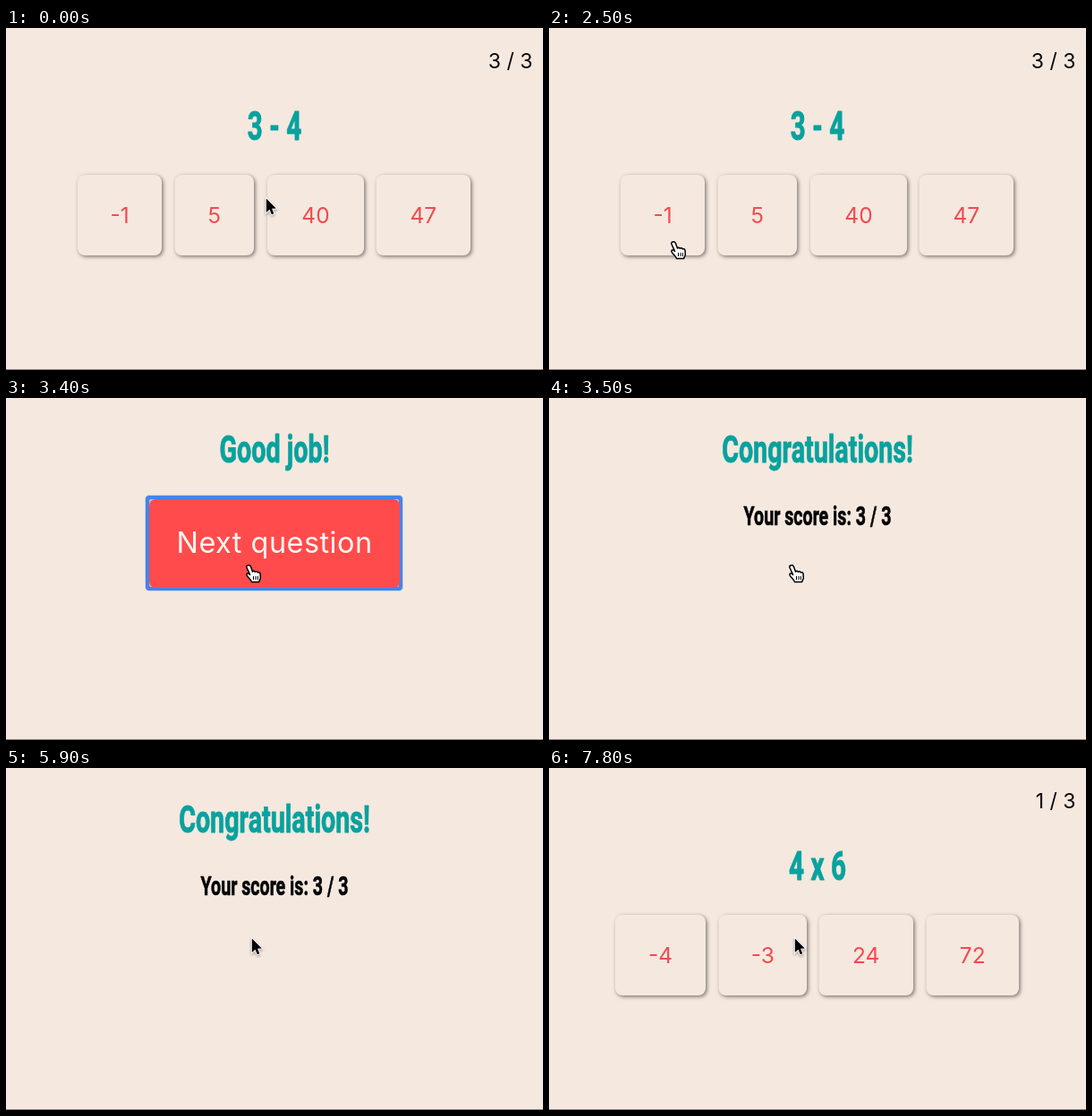
Animation, 600 px wide and 382 px high, one loop 8000 ms. Source, as an HTML page with a canvas:

```html
<!DOCTYPE html>
<html lang="en">
<head>
<meta charset="utf-8">
<title>Arithmetic quiz</title>
<style>
html, body { margin: 0; width: 100%; height: 100%; overflow: hidden; background: #f5e8df; }
canvas { display: block; width: 600px; height: 382px; }
</style>
</head>
<body>
<canvas id="stage" width="600" height="382"></canvas>
<script>
const ctx = document.getElementById('stage').getContext('2d');
const LOOP = 8000, TICK = 100;
const PAPER = '#f5e8df', TEAL = '#08a29e', RED = '#ef4b50', BLACK = '#050505';
const SANS = 'Inter, "Open Sans", sans-serif';
const HEADING = 'Roboto, "Liberation Sans", sans-serif';
const NARROW = 0.667; // proportion of the condensed heading face

const CARD_Y = 164, CARD_H = 90;
const BUTTON = { x: 160, y: 113, w: 280, h: 99 };

// Cards: left edge, width, answer
const lastQuestion = {
  text: '3 - 4', progress: '3 / 3',
  cards: [[80, 94, '-1'], [188.5, 88.5, '5'], [292, 108, '40'], [413.5, 105.5, '47']]
};
const firstQuestion = {
  text: '4 x 6', progress: '1 / 3',
  cards: [[74, 101, '-4'], [189.5, 98.5, '-3'], [301.5, 105.5, '24'], [421.5, 103.5, '72']]
};

// Pointer moves: start, end, destination
const START = [290, 189];
const MOVES = [
  [0, 200, 291, 191],
  [300, 900, 248, 256],
  [2100, 2500, 142, 241],
  [2700, 3300, 274, 189]
];

const ARROW = new Path2D('M0 0V15.6L3.7 12.2L6 17.8L8.5 16.8L6.3 11.3L11 11Z');
const HAND = new Path2D('M4 1.5q2.5-1 3.5 1.5l2 5.5c1-1.2 2.4-.8 2.8.3c1-1 2.4-.6 2.9.6' +
  'c1.5-.7 2.8.2 2.9 2l.2 4c0 1.8-1.5 2.5-1.6 4.6H8.6c-.6-2-3-4-5-6.5' +
  'c-1.6-2-.3-3.8 1.4-2.8l1.6 1.2L3 4q-.8-1.8 1-2.5z');
const KNUCKLES = new Path2D('M10.5 13.5v4M13 13.5v4M15.3 13.5v4');

function pointerAt(t) {
  let [x, y] = START;
  for (const [from, to, tx, ty] of MOVES) {
    const p = Math.min(1, Math.max(0, (t - from) / (to - from)));
    const e = p * p * (3 - 2 * p);
    x += (tx - x) * e;
    y += (ty - y) * e;
  }
  return { x, y };
}

function inside(p, x, y, w, h) {
  return p.x >= x && p.x <= x + w && p.y >= y && p.y <= y + h;
}

function fillRound(x, y, w, h, r, color) {
  ctx.fillStyle = color;
  ctx.beginPath();
  ctx.roundRect(x, y, w, h, r);
  ctx.fill();
}

function heading(text, y, size, color) {
  ctx.save();
  ctx.translate(300, y);
  ctx.scale(NARROW, 1);
  ctx.font = `700 ${size}px ${HEADING}`;
  ctx.textAlign = 'center';
  ctx.fillStyle = ctx.strokeStyle = color;
  ctx.lineWidth = size / 45;
  ctx.lineJoin = 'round';
  ctx.fillText(text, 0, 0);
  ctx.strokeText(text, 0, 0);
  ctx.restore();
}

function label(text, x, y, size, color, align = 'center') {
  ctx.font = `400 ${size}px ${SANS}`;
  ctx.textAlign = align;
  ctx.fillStyle = color;
  ctx.fillText(text, x, y);
}

function drawCard([x, w, answer]) {
  ctx.save();
  ctx.shadowColor = 'rgba(0, 0, 0, .5)';
  ctx.shadowBlur = 4;
  ctx.shadowOffsetX = ctx.shadowOffsetY = 1.5;
  fillRound(x, CARD_Y, w, CARD_H, 8, PAPER);
  ctx.restore();
  label(answer, x + w / 2, 218, 24.5, RED);
}

function drawQuestion({ text, progress, cards }) {
  label(progress, 588.5, 45, 23, BLACK, 'right');
  heading(text, 125, 44.5, TEAL);
  cards.forEach(drawCard);
}

function drawPraise(focused) {
  const { x, y, w, h } = BUTTON;
  heading('Good job!', 72, 43, TEAL);
  if (focused) {
    fillRound(x - 5, y - 5, w + 9, h + 9, 5, '#cdd3dc');
    fillRound(x - 4, y - 4, w + 7, h + 7, 4, '#4683ea');
    fillRound(x, y, w - 1, h - 1, 2, '#b9c6e4');
  }
  fillRound(x, y, w, h, 7, '#ff4b4b');
  ctx.letterSpacing = '0.5px';
  label('Next question', 300, 173, 32.4, '#fff7f3');
  ctx.letterSpacing = '0px';
}

function drawResult() {
  heading('Congratulations!', 72, 43, TEAL);
  heading('Your score is: 3 / 3', 142, 29.4, BLACK);
}

function drawHand({ x, y }) {
  ctx.save();
  ctx.translate(x - 8, y - 3.5);
  ctx.lineJoin = 'round';
  ctx.fillStyle = '#fff';
  ctx.strokeStyle = '#000';
  ctx.lineWidth = 1.5;
  ctx.fill(HAND);
  ctx.stroke(HAND);
  ctx.lineWidth = 1;
  ctx.stroke(KNUCKLES);
  ctx.restore();
}

function drawArrow({ x, y }) {
  ctx.save();
  ctx.translate(x + 0.8, y + 1.5);
  ctx.lineWidth = 1.8;
  ctx.strokeStyle = '#fff';
  ctx.shadowColor = 'rgba(0, 0, 0, .35)';
  ctx.shadowBlur = 3;
  ctx.shadowOffsetY = 1.5;
  ctx.stroke(ARROW);
  ctx.shadowColor = 'transparent';
  ctx.fillStyle = '#000';
  ctx.fill(ARROW);
  ctx.restore();
}

function draw(t) {
  const p = pointerAt(t);
  let hand = false;
  ctx.fillStyle = PAPER;
  ctx.fillRect(0, 0, 600, 382);

  if (t < 2700) {
    drawQuestion(lastQuestion);
    hand = lastQuestion.cards.some(([x, w]) => inside(p, x, CARD_Y, w, CARD_H));
  } else if (t < 3500) {
    drawPraise(t >= 3300);
    const { x, y, w, h } = BUTTON;
    hand = t < 2800 || inside(p, x, y, w, h);
  } else if (t < 7700) {
    drawResult();
    hand = t < 3600;
  } else {
    drawQuestion(firstQuestion);
  }

  ctx.fillStyle = '#8a8480';
  ctx.fillRect(0, 381, 600, 1);
  (hand ? drawHand : drawArrow)(p);
}

function loop() {
  const t = performance.now() % LOOP;
  draw(Math.floor(t / TICK) * TICK);
  requestAnimationFrame(loop);
}
loop();
</script>
</body>
</html>
```
